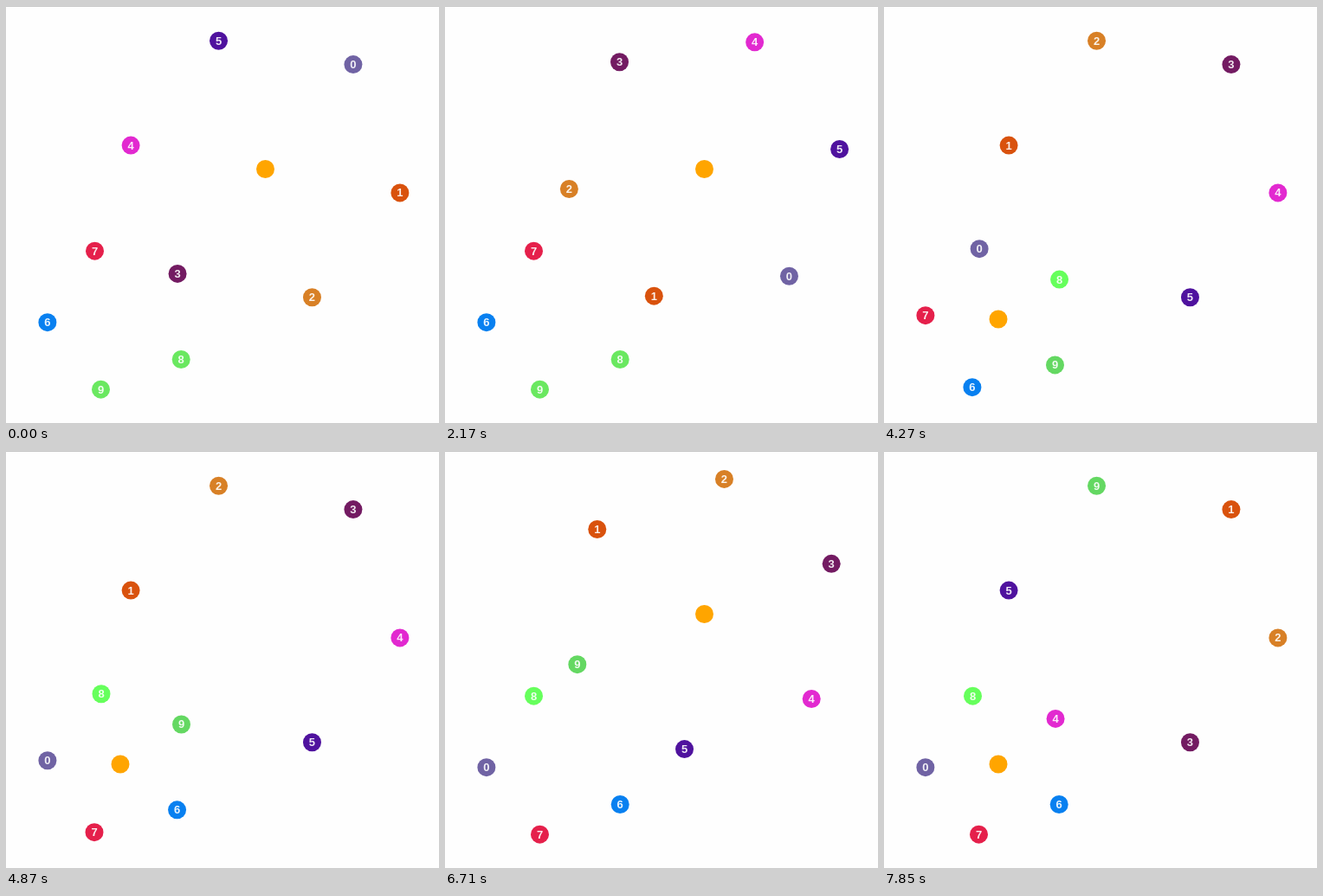
Animation of 500x482 px, one loop 8000 ms. Source, as an HTML page:

```html
<!DOCTYPE html>
<html lang="en">
<head>
<meta charset="utf-8">
<title>Two rings</title>
<style>
  html, body { margin: 0; width: 100%; height: 100%; overflow: hidden; background: #fefefe; }
  svg { display: block; }
  text {
    font: bold 13px "Liberation Sans", Arial, sans-serif;
    fill: #fff; fill-opacity: .9; text-anchor: middle;
  }
</style>
</head>
<body>
<svg id="stage" width="500" height="482" viewBox="0 0 500 482">
  <rect width="500" height="1" fill="#c8c8c8"/>
  <circle id="hub" r="10.5" fill="#ffa500"/>
</svg>
<script>
const LOOP = 8000, STEP = 500;

// slots: the places on a ring in clockwise order; place 3 lies on both rings
const big = { x: 299.5, y: 188.5, r: 157.8, from: -50, slots: [0, 1, 2, 3, 4, 5] };
const small = { x: 132, y: 362, r: 84.2, from: -38.5, slots: [3, 6, 7, 8, 9] };
const startOrder = [0, 1, 2, 3, 4, 5, 8, 9, 6, 7];
const colors = ['#7063a4', '#d9520d', '#d88026', '#731b62', '#e229d0',
                '#4f129e', '#0880f0', '#e5204b', '#66ff5c', '#64d862'];
const earlyGreen = '#6ae860';

const moves = [
  [1203, big, 1], [1967, big, 1], [2703, big, 1],
  [3938, small, -1], [4537, small, -1], [5045, small, 1], [5606, small, -1],
  [6571, big, 1], [7073, big, 1]
];
const hubs = [[0, big], [3350, small], [6150, big], [7850, small]];

const stage = document.getElementById('stage');
const hub = document.getElementById('hub');

function add(parent, tag, attrs) {
  const el = document.createElementNS('http://www.w3.org/2000/svg', tag);
  for (const key in attrs) el.setAttribute(key, attrs[key]);
  return parent.appendChild(el);
}

const balls = colors.map((fill, i) => {
  const g = add(stage, 'g', {});
  const disc = add(g, 'circle', { r: 10.5, fill });
  add(g, 'text', { y: 4.5 }).textContent = i;
  return { g, disc };
});

// cubic-bezier(.25, .1, .25, 1)
function ease(x) {
  let lo = 0, hi = 1;
  for (let i = 0; i < 24; i++) {
    const s = (lo + hi) / 2;
    if (0.75 * s * (1 - s) + s ** 3 < x) lo = s; else hi = s;
  }
  const s = (lo + hi) / 2, q = 1 - s;
  return 0.3 * q * q * s + 3 * q * s * s + s ** 3;
}

function placeOn(ring, order, turn) {
  const n = ring.slots.length;
  ring.slots.forEach((slot, k) => {
    const a = (ring.from + (k + turn) * 360 / n) * Math.PI / 180;
    const x = ring.x + ring.r * Math.cos(a), y = ring.y + ring.r * Math.sin(a);
    balls[order[slot]].g.setAttribute('transform', `translate(${x.toFixed(2)} ${y.toFixed(2)})`);
  });
}

function rotate(order, ring, dir) {
  const next = order.slice(), n = ring.slots.length;
  ring.slots.forEach((slot, k) => {
    next[ring.slots[(k + dir + n) % n]] = order[slot];
  });
  return next;
}

function draw(t) {
  let order = startOrder, active = big, turn = 0;
  for (const [at, ring, dir] of moves) {
    if (t < at) break;
    if (t < at + STEP) {
      active = ring;
      turn = dir * ease((t - at) / STEP);
      break;
    }
    order = rotate(order, ring, dir);
  }
  placeOn(active === big ? small : big, order, 0);
  placeOn(active, order, turn);

  for (const i of [8, 9]) balls[i].disc.setAttribute('fill', t < 3938 ? earlyGreen : colors[i]);

  const center = hubs.filter(h => h[0] <= t).pop()[1];
  hub.setAttribute('cx', center.x);
  hub.setAttribute('cy', center.y);
}

const begin = performance.now();
function tick() {
  draw((performance.now() - begin) % LOOP);
  requestAnimationFrame(tick);
}
tick();
</script>
</body>
</html>
```
